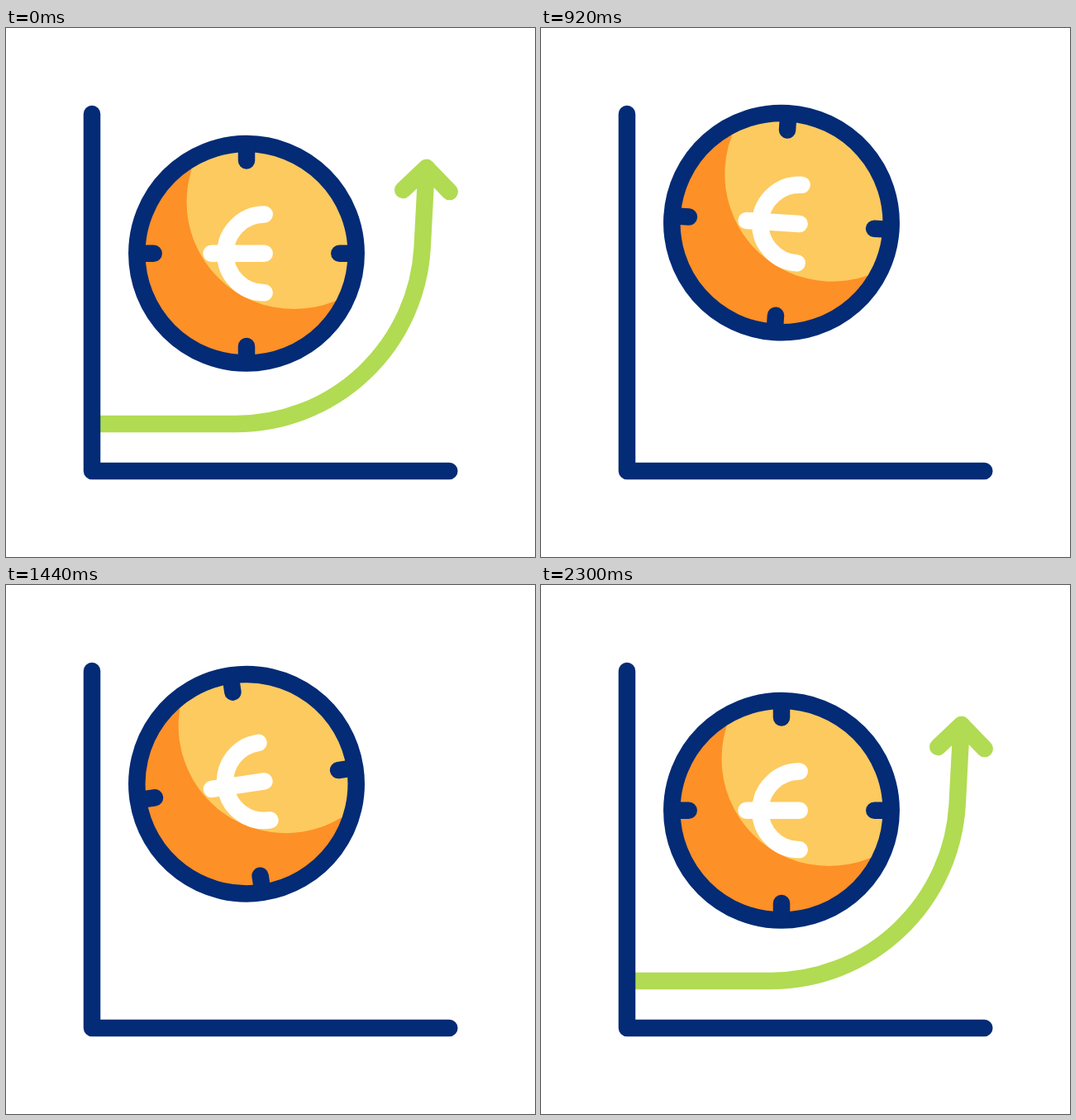
Recreate the animation shown at these times as an HTML page. Size 640x640 px, loop 2.4 s.

```html
<!DOCTYPE html>
<html lang="en">
<head>
<meta charset="utf-8">
<title>Growth chart</title>
<style>
  html, body { margin: 0; width: 100%; height: 100%; overflow: hidden; background: #fff; }
  svg { display: block; width: 100%; height: 100%; }
  .line { fill: none; stroke-width: 20.5; stroke-linecap: round; stroke-linejoin: round; }
  .navy { stroke: #032b76; }
  .green { stroke: #b1db52; }
  .white { stroke: #fff; }
</style>
</head>
<body>
<svg viewBox="0 0 640 640">
  <defs>
    <clipPath id="plot"><path d="M104 0H640V640H104Z"/></clipPath>
    <clipPath id="face"><circle r="132"/></clipPath>
  </defs>

  <g id="arrow" class="line green" clip-path="url(#plot)">
    <path id="trail" d="M104 479H278A226 226 0 0 0 503.6 266L508.7 169"/>
    <path id="head" d="M-28.5 -27L0 0L-27.5 29.5"/>
  </g>

  <path class="line navy" d="M104 104V536H536.3"/>

  <g id="coin">
    <circle r="132" fill="#fd9026"/>
    <circle cx="57.5" cy="-62.7" r="130" fill="#fcca5e" clip-path="url(#face)"/>
    <path class="line white" d="M21.7 -47.2A47.2 47.2 0 0 0 21.7 47.5M-42.5 0H21.7"/>
    <circle class="line navy" r="132.7"/>
    <path class="line navy" d="M0 -132V-112.3M0 132V112.3M-132 0H-112.3M132 0H112.3"/>
  </g>
</svg>
<script>
  const LOOP = 2400, STEP = 20;
  const [arrow, trail, head, coin] =
    ["arrow", "trail", "head", "coin"].map(id => document.getElementById(id));
  const length = trail.getTotalLength();

  // [time in ms, value]
  const lift = [[580, 0], [895, -38.7], [1190, 36], [1500, -39.5], [1815, 34], [2130, -54.5], [2300, 0]];
  const tilt = [[655, 0], [1150, 6.5], [1600, -14.6], [2100, 0]];

  function ease(t, from, to) {
    const p = Math.min(1, Math.max(0, (t - from) / (to - from)));
    return p * p * (3 - 2 * p);
  }

  function track(keys, t) {
    let value = keys[0][1];
    for (let i = 1; i < keys.length; i++) {
      value += (keys[i][1] - keys[i - 1][1]) * ease(t, keys[i - 1][0], keys[i][0]);
    }
    return value;
  }

  function drawArrow(t) {
    const entering = t > 1200;
    const start = entering ? 0 : length * ease(t, 200, 600);
    const end = entering ? length * ease(t, 1785, 2280) : length;
    const size = entering ? 1 : 1 - ease(t, 520, 620);
    const visible = entering ? t > 1785 : t < 620;
    arrow.setAttribute("visibility", visible ? "visible" : "hidden");
    if (!visible) return;

    trail.setAttribute("stroke-dasharray", `0 ${start} ${end - start} ${2 * length}`);
    trail.setAttribute("visibility", end - start > 0.5 ? "inherit" : "hidden");

    const tip = trail.getPointAtLength(end);
    const a = trail.getPointAtLength(Math.max(0, end - 2));
    const b = trail.getPointAtLength(Math.max(2, end));
    const angle = Math.atan2(b.y - a.y, b.x - a.x) * 180 / Math.PI;
    head.setAttribute("transform", `translate(${tip.x} ${tip.y}) rotate(${angle}) scale(${size})`);
  }

  function draw(t) {
    drawArrow(t);
    coin.setAttribute("transform", `translate(291 ${272.8 + track(lift, t)}) rotate(${track(tilt, t)})`);
  }

  const began = performance.now();
  function tick() {
    const t = (performance.now() - began) % LOOP;
    draw(Math.floor(t / STEP) * STEP);
    requestAnimationFrame(tick);
  }
  tick();
</script>
</body>
</html>
```
